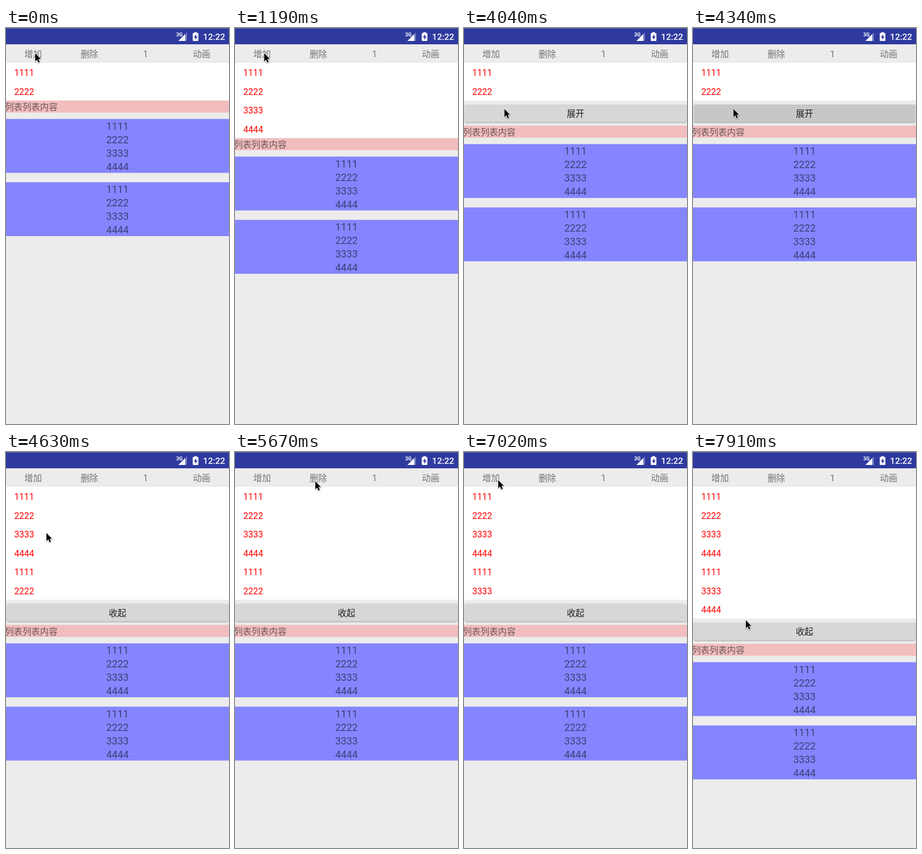
An HTML page with a canvas for the animation above (8000 ms loop, 397 px wide and 704 px high).

```html
<!DOCTYPE html>
<html lang="zh">
<head>
<meta charset="utf-8">
<style>
  html, body { margin: 0; width: 100%; height: 100%; overflow: hidden; background: #ececec; }
  canvas { display: block; }
</style>
</head>
<body>
<canvas id="stage" width="397" height="704"></canvas>
<script>
const ctx = document.getElementById('stage').getContext('2d');
const W = 397, H = 704, LOOP = 8000;
const FONT = 'Roboto, "Noto Sans CJK SC", "Noto Sans CJK", sans-serif';
const LIST_TOP = 62, ROW = 33.45;
const DIGITS = ['1111', '2222', '3333', '4444'];

// [start time, visible rows]
const ROW_STEPS = [[0, 2], [750, 3], [1190, 4], [2090, 2], [4490, 6], [5970, 5], [7020, 6], [7320, 7]];

// Pointer moves: first and last step time, step count, goal, sideways bend of the path
const MOVES = [
  { from: 2690, to: 2690, n: 1, x: 51, y: 45, bx: 0, by: 0 },
  { from: 3590, to: 4040, n: 4, x: 71, y: 143, bx: -4, by: 0 },
  { from: 5080, to: 5670, n: 5, x: 142, y: 51, bx: 0, by: 0 },
  { from: 6270, to: 6720, n: 4, x: 60, y: 49, bx: 0, by: 17 },
  { from: 7470, to: 7910, n: 4, x: 93, y: 298, bx: 0, by: 0 }
];

function rect(x, y, w, h, color) {
  ctx.fillStyle = color;
  ctx.fillRect(x, y, w, h);
}

function poly(points, color) {
  ctx.beginPath();
  points.forEach(([x, y]) => ctx.lineTo(x, y));
  ctx.closePath();
  ctx.fillStyle = color;
  ctx.fill();
}

// Text placed by the vertical centre of its glyphs
function text(str, x, cy, size, color, align = 'center', weight = 400) {
  const cjk = /[^\x00-\x7f]/.test(str);
  ctx.font = `${weight} ${size}px ${FONT}`;
  ctx.textAlign = align;
  ctx.fillStyle = color;
  ctx.fillText(str, x, cy + size * (cjk ? 0.38 : 0.356));
}

function rowCount(t) {
  return ROW_STEPS.filter(s => s[0] <= t).pop()[1];
}

function rowLabel(i, t) {
  const shift = i >= 5 && t >= 5970 ? 1 : 0;
  return DIGITS[(i + shift) % 4];
}

function pointerAt(t) {
  let x = 51, y = 44;
  for (const m of MOVES) {
    if (t < m.from) break;
    const step = (m.to - m.from) / (m.n - 1) || 1;
    const k = Math.min(m.n, Math.floor((t - m.from) / step + 1e-6) + 1) / m.n;
    const p = k * k * (3 - 2 * k), bow = 4 * p * (1 - p);
    x += (m.x - x) * p + m.bx * bow;
    y += (m.y - y) * p + m.by * bow;
  }
  return [Math.round(x), Math.round(y)];
}

function drawStatusBar() {
  rect(0, 0, W, 29, '#2f3a9f');
  rect(0, 0, W, 1, '#777b9c');
  text('3G', 303, 11.5, 9, '#fff', 'left', 700);
  poly([[307, 23], [322, 8], [322, 23]], 'rgba(255,255,255,.35)');
  poly([[307, 23], [319, 11], [319, 23]], '#fff');
  rect(335, 7.5, 5, 2, '#fff');
  ctx.beginPath();
  ctx.roundRect(332.5, 9, 10, 14, 1);
  ctx.fillStyle = '#fff';
  ctx.fill();
  poly([[338.5, 11], [334.5, 17], [337, 17], [337, 21], [341, 15], [338.5, 15]], '#2f3a9f');
  text('12:22', 370.5, 15.7, 15.5, '#fff', 'center', 500);
}

function drawTabs() {
  ['增加', '删除', '1', '动画'].forEach((label, i) =>
    text(label, 48.3 + i * 100, 46.3, 15.6, '#737373'));
}

function drawButton(y, label, pressed) {
  ctx.save();
  ctx.shadowColor = 'rgba(0,0,0,.35)';
  ctx.shadowBlur = 2;
  ctx.shadowOffsetY = 1;
  ctx.beginPath();
  ctx.roundRect(1.8, y + 7, 393.6, 31.5, 2);
  ctx.fillStyle = pressed ? '#c6c8c8' : '#d6d7d7';
  ctx.fill();
  ctx.restore();
  text(label, 198.5, y + 23, 15.6, 'rgba(0,0,0,.87)');
}

function drawBlock(y) {
  rect(0, y, W, 95.8, '#8585ff');
  DIGITS.forEach((d, i) => text(d, 198.5, y + 12.6 + i * 24, 17.8, '#3f3f7a'));
}

function drawPointer(x, y) {
  const arrow = new Path2D('M1 1V15.2L4.3 12.2L6.6 17.4L9 16.4L6.8 11.3H11Z');
  ctx.save();
  ctx.translate(x, y);
  ctx.shadowColor = 'rgba(0,0,0,.35)';
  ctx.shadowBlur = 2;
  ctx.shadowOffsetY = 1;
  ctx.strokeStyle = '#fff';
  ctx.lineWidth = 1.6;
  ctx.lineJoin = 'round';
  ctx.stroke(arrow);
  ctx.shadowColor = 'transparent';
  ctx.fillStyle = '#000';
  ctx.fill(arrow);
  ctx.restore();
}

function draw(t) {
  rect(0, 0, W, H, '#ececec');
  drawStatusBar();
  drawTabs();

  const rows = rowCount(t);
  let y = LIST_TOP + rows * ROW;
  rect(0, LIST_TOP, W, y - LIST_TOP, '#fff');
  for (let i = 0; i < rows; i++) {
    text(rowLabel(i, t), 14.7, 79.7 + i * ROW, 15.7, '#f00', 'left');
  }

  if (t >= 2090) {
    drawButton(y, t < 4490 ? '展开' : '收起', t >= 4340 && t < 4630);
    y += 44.7;
  }
  rect(0, y, W, 21.4, '#f1bdbe');
  text('列表列表内容', -1.8, y + 11.4, 15.6, '#6d5656', 'left');
  drawBlock(y + 32.8);
  drawBlock(y + 145.3);
  drawPointer(...pointerAt(t));
}

const start = performance.now();
function tick() {
  draw((performance.now() - start) % LOOP);
  requestAnimationFrame(tick);
}
tick();
</script>
</body>
</html>
```
